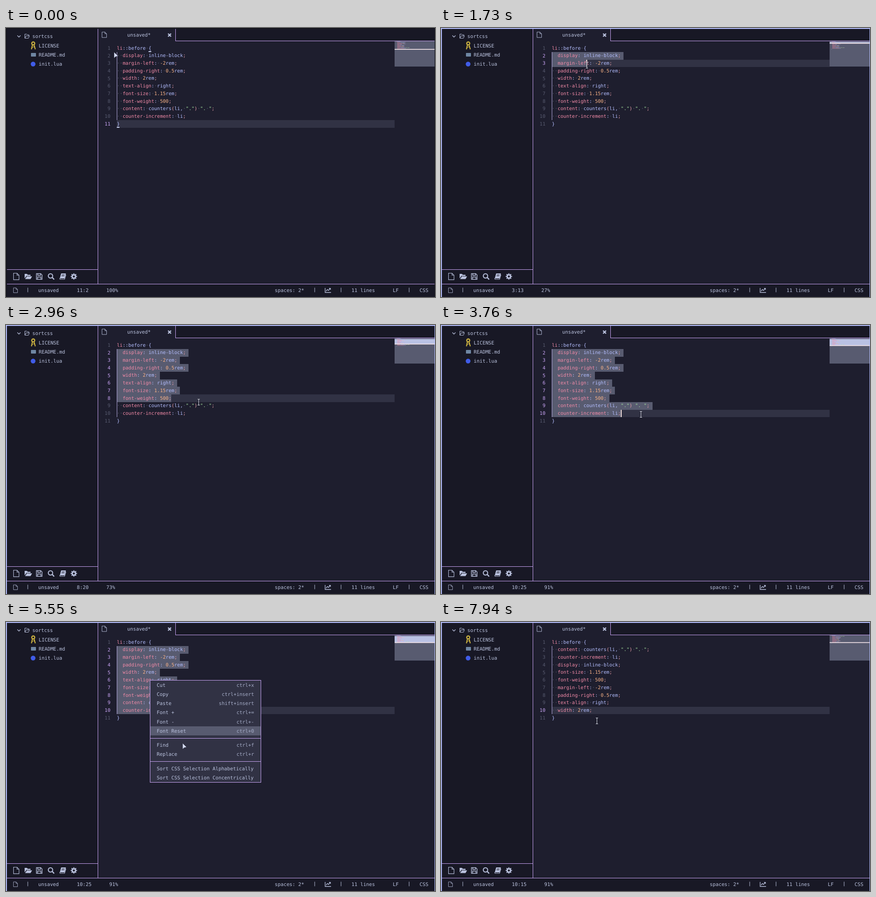
These frames come from a looping animation (945 by 593 pixels, 8 s). An HTML page:

```html
<!DOCTYPE html>
<html lang="en">
<head>
<meta charset="utf-8">
<title>Sorting CSS in an editor</title>
<style>
  html, body { margin: 0; width: 100%; height: 100%; overflow: hidden; background: #181825; }
  svg { display: block; width: 945px; height: 593px; }
  text { font-family: "DejaVu Sans Mono", "Noto Sans Mono", monospace; text-rendering: geometricPrecision; white-space: pre; }
  .ui text { font-size: 10.75px; fill: #bac2de; }
  .code text { font-size: 10.5px; }
  .end { text-anchor: end; }
  .crisp { shape-rendering: crispEdges; }
  .line { fill: none; stroke: #bac2de; }
  .fill { fill: #bac2de; }
  .edge { fill: none; stroke: #cba6f7; shape-rendering: crispEdges; }
  .prop { fill: #f38ba8; }
  .word { fill: #b4befe; }
  .num { fill: #fab387; }
  .str { fill: #a6e3a1; }
  .punct { fill: #eba0ac; }
  .dot { fill: #585b70; }
  #numbers text { fill: #585b70; }
  #numbers .on { fill: #cba6f7; }
  #menu .key { fill: #a6adc8; }
</style>
</head>
<body>
<svg viewBox="0 0 945 593">
  <defs>
    <path id="file" d="M.5.5h7l4 4v9H.5zM7.5.5v4h4"/>
  </defs>

  <rect width="945" height="593" fill="#181825"/>
  <path class="crisp" d="M203 0h170v29h572v535H203z" fill="#1e1e2e"/>

  <g class="crisp">
    <rect id="lineBg" x="244" width="612" height="17" fill="#313244"/>
    <path id="selection" fill="#585b70"/>
    <rect x="244" y="53" width="1" height="150" fill="#b4a8dc"/>
  </g>
  <g class="code">
    <g id="numbers"></g>
    <g id="before"></g>
    <g id="after"></g>
  </g>
  <path id="brackets" class="crisp" d="M314 51h6v1.5h-6zM244 218h6v1.5h-6z" fill="#cdd6f4"/>
  <rect id="caret" class="crisp" width="2" height="16" fill="#f5e0dc"/>

  <rect class="crisp" x="856" y="29" width="89" height="56" fill="#585b70"/>
  <rect id="mapSel" x="856" y="31" width="89" fill="#bac2e4"/>
  <g id="mapBefore" opacity=".62"></g>
  <g id="mapAfter" opacity=".62"></g>
  <rect id="mapCaret" x="856" width="89" height="1.7" fill="#f5e6ea"/>

  <path class="edge" d="M202.5 0V564M373.5 2V28.5H945M0 532.5H202M0 564.5H945"/>

  <g class="ui">
    <path class="line" d="M25 16.5l3.5 3.5 3.5-3.5" stroke-width="1.3"/>
    <path class="line" d="M41.5 22.5v-9h4l1.5 1.5h3.5v2.5M41.5 22.5l2.5-5h7.5l-2 5z"/>
    <text x="58" y="22">sortcss</text>
    <g fill="none" stroke="#c9b040">
      <circle cx="60" cy="34" r="3.3" stroke-width="2.4"/>
      <path d="M58.5 36l-2.5 11M61.5 36l3 11M57 42l2 1M62.5 41l-2 1" stroke-width="2.2"/>
    </g>
    <text x="72" y="42.5">LICENSE</text>
    <rect x="55" y="55" width="11" height="8" rx="1" fill="#6f87a3"/>
    <text x="72" y="62.5">README.md</text>
    <circle cx="59.7" cy="79.5" r="5.2" fill="#405ce8"/>
    <text x="72" y="82.5">init.lua</text>

    <use href="#file" class="line" transform="translate(211 8.5) scale(.92)"/>
    <text x="267" y="18.5">unsaved*</text>
    <path class="line" d="M357 12.3l6.6 6.6m0-6.6l-6.6 6.6" stroke-width="2.5"/>

    <use href="#file" class="line" transform="translate(16 540) scale(1.1)"/>
    <path class="fill" d="M41 552v-10h5l2 2h6v2.500h-9zM42 553.500l4-6h11.500l-3.500 6z"/>
    <path class="line" d="M67 541.500h9.500l3 3v9.500H67zM70 541.500v4h6v-4M69.500 554v-5h7.500v5" stroke-width="1.4"/>
    <path class="line" d="M102 550l4 4.500" stroke-width="2.6"/>
    <circle class="line" cx="98" cy="546.500" r="4.800" stroke-width="2.1"/>
    <path class="fill" d="M121.500 541h10.500l-3 11h-10.500z"/>
    <path class="line" d="M118.500 551.500q-.500 2.500 1.500 2.500h9l3-10" stroke-width="1.2"/>
    <path d="M123 544h6m-6.700 2.500h6" stroke="#181825"/>
    <circle class="line" cx="149.500" cy="547.700" r="3.700" stroke-width="3"/>
    <circle class="line" cx="149.500" cy="547.700" r="5.800" stroke-width="2.400" pathLength="16" stroke-dasharray="1" stroke-dashoffset=".5"/>

    <use href="#file" class="line" transform="translate(16 572.500) scale(.82)"/>
    <path class="line" d="M48 572.500v10M680 572.500v10M738 572.500v10M888 572.500v10"/>
    <text x="71" y="581.500">unsaved</text>
    <text id="position" x="156" y="581.500"></text>
    <text id="percent" y="581.500"></text>
    <text x="592" y="581.500">spaces: 2*</text>
    <path class="line" d="M703 573v10h13M705 580l3-3.500 2.500 2 4-4.500M711.500 574h3.200v3.200" stroke-width="1.300"/>
    <text x="761" y="581.500">11 lines</text>
    <text x="852" y="581.500">LF</text>
    <text x="911" y="581.500">CSS</text>

    <g id="menu">
      <rect class="crisp" x="317" y="128" width="244" height="226" fill="#313244"/>
      <rect id="hover" class="crisp" x="318" width="243" height="20" fill="#585b70"/>
      <path class="edge" d="M317.500 128.500h243.500v225H317.500zM317.500 256.500H561M317.500 307.500H561"/>
    </g>
  </g>

  <path id="frame" class="crisp" d="M0 0H945V593H944V1.500H2V593H0z"/>
  <path id="arrow" d="M0 0V13.500L3.300 10.300 9 9z" fill="#d5dcf5" stroke="#181825" stroke-width=".6"/>
  <g id="beam" fill="none">
    <path d="M-2.500-6.500h5M0-6.500v13M-2.500 6.500h5" stroke="#11111b" stroke-width="2.4" opacity=".6"/>
    <path d="M-2.500-6.500h5M0-6.500v13M-2.500 6.500h5" stroke="#e6e9f7"/>
  </g>
</svg>

<script>
const LOOP = 8000;
const CHAR = 6.3215, LEFT = 244.3, TOP = 36.2, ROW = 16.7, MAP_ROW = 1.67;
const FOCUS = 840, DRAG_END = 3600, MENU_OPEN = 4680, SORTED = 7310, DESELECT = 7710;

const $ = id => document.getElementById(id);
const show = (id, on) => $(id).setAttribute('display', on ? 'inline' : 'none');
const set = (id, attrs) => Object.entries(attrs).forEach(([k, v]) => $(id).setAttribute(k, v));
const place = (id, x, y) => set(id, { transform: `translate(${x} ${y})` });
const rowTop = line => Math.round(TOP + ROW * (line - 1));
const mapTop = line => 29.5 + MAP_ROW * (line - 1);

const rules = [
  'display: inline-block;', 'margin-left: -2rem;', 'padding-right: 0.5rem;',
  'width: 2rem;', 'text-align: right;', 'font-size: 1.15rem;', 'font-weight: 500;',
  'content: counters(li, ".") ". ";', 'counter-increment: li;'
];
const wrap = list => ['li::before {', ...list.map(r => '  ' + r), '}'];
const unsorted = wrap(rules), sorted = wrap([...rules].sort());

const kinds = [
  ['str', /^"/], ['num', /^-?\d/], ['dot', /^ /], ['punct', /^[();]/], ['word', /./]
];

function tokens(line) {
  const pattern = /"[^"]*"|-?\d[\d.]*|[a-z-]+(?=:)|[a-z-]+| +|./g;
  return [...line.matchAll(pattern)].map(m => {
    const isProp = /^[a-z]/.test(m[0]) && line[m.index + m[0].length] === ':' && m.index < 3;
    return { text: m[0], at: m.index, kind: isProp ? 'prop' : kinds.find(k => k[1].test(m[0]))[0] };
  });
}

function codeLine(line, i) {
  const spans = tokens(line).map(({ text, kind }) => {
    const body = text.replace(/ /g, kind === 'dot' ? '·' : '<tspan class="dot">·</tspan>');
    return `<tspan class="${kind}">${body}</tspan>`;
  });
  return `<text x="${LEFT}" y="${TOP + ROW * i + 11.4}">${spans.join('')}</text>`;
}

const mapLine = (line, i) => tokens(line).filter(k => k.kind !== 'dot').map(k =>
  `<rect class="${k.kind}" x="${860 + k.at * .85}" y="${mapTop(i + 1)}" width="${k.text.length * .85}" height=".9"/>`).join('');

$('before').innerHTML = unsorted.map(codeLine).join('');
$('after').innerHTML = sorted.map(codeLine).join('');
$('mapBefore').innerHTML = unsorted.map(mapLine).join('');
$('mapAfter').innerHTML = sorted.map(mapLine).join('');
$('numbers').innerHTML = unsorted.map((_, i) =>
  `<text class="end" x="230" y="${TOP + ROW * i + 11.6}">${i + 1}</text>`).join('');
const numbers = [...$('numbers').children];

const ITEM = 20.2;
const items = [
  [129, 'Cut', 'ctrl+x'], [149.2, 'Copy', 'ctrl+insert'], [169.4, 'Paste', 'shift+insert'],
  [189.6, 'Font +', 'ctrl+='], [209.8, 'Font -', 'ctrl+-'], [230, 'Font Reset', 'ctrl+0'],
  [261, 'Find', 'ctrl+f'], [281.2, 'Replace', 'ctrl+r'],
  [312.8, 'Sort CSS Selection Alphabetically', ''], [333, 'Sort CSS Selection Concentrically', '']
];
$('menu').insertAdjacentHTML('beforeend', items.map(([y, label, key]) =>
  `<text x="332" y="${y + 13.8}">${label}</text><text class="key end" x="546.5" y="${y + 13.8}">${key}</text>`).join(''));

// Pointer path: time, x, y
const path = [
  [0, 238, 53], [20, 238, 53], [110, 227, 55], [230, 248, 61], [380, 248, 61], [500, 248, 53],
  [610, 247, 61], [1040, 247, 61], [1730, 321, 82], [2390, 398, 139], [2570, 412, 152],
  [2670, 414, 154], [3420, 440, 195], [3520, 440, 197], [3760, 440, 197], [4560, 317, 129],
  [4680, 317, 129], [5450, 380, 243], [5549, 380, 243], [5550, 389, 267], [6340, 402, 326],
  [6440, 402, 326], [6500, 405, 336], [6580, 406, 327], [6970, 406, 327], [6990, 406, 324],
  [7690, 406, 324], [7940, 343, 218], [LOOP, 343, 218]
];

function pointer(t) {
  const i = Math.max(1, path.findIndex(p => p[0] > t));
  const [a, b] = [path[i - 1], path[i]];
  const k = (t - a[0]) / (b[0] - a[0]);
  return { x: a[1] + (b[1] - a[1]) * k, y: a[2] + (b[2] - a[2]) * k };
}

function cursor(t) {
  if (t < FOCUS) return { line: 11, col: 2 };
  if (t >= SORTED) return { line: 10, col: 15 };
  const p = pointer(Math.min(t, DRAG_END));
  const line = Math.min(10, Math.max(2, Math.floor((p.y - 3 - TOP) / ROW) + 1));
  const col = Math.round((p.x - LEFT) / CHAR);
  return { line, col: Math.min(unsorted[line - 1].length, Math.max(0, col)) + 1 };
}

function selectionPath(lines, { line, col }) {
  let d = '';
  for (let i = 2; i <= line; i++) {
    const chars = i < line ? lines[i - 1].length + 1 : col - 1;
    d += `M244 ${rowTop(i)}H${LEFT + chars * CHAR}V${rowTop(i + 1)}H244z`;
  }
  return d;
}

function render(t) {
  const isSorted = t >= SORTED, focused = t >= FOCUS;
  const menu = t >= MENU_OPEN && !isSorted;
  const selecting = focused && t < DESELECT;
  const at = cursor(t), p = pointer(t);

  ['before', 'mapBefore'].forEach(id => show(id, !isSorted));
  ['after', 'mapAfter'].forEach(id => show(id, isSorted));
  show('brackets', !focused);
  set('frame', { fill: focused ? '#b4befe' : '#11111b' });

  set('lineBg', { y: rowTop(at.line), height: rowTop(at.line + 1) - rowTop(at.line) });
  set('selection', { d: selecting ? selectionPath(isSorted ? sorted : unsorted, at) : '' });
  numbers.forEach((n, i) => n.classList.toggle('on',
    i + 1 === at.line || (selecting && i > 0 && i < at.line)));

  set('caret', { x: Math.round(LEFT + (at.col - 1) * CHAR - .4), y: rowTop(at.line) });
  show('caret', (t >= 1640 && t < 1840) || (t >= 3760 && t < 4160) || (t >= 4560 && t < 4960));

  set('mapCaret', { y: mapTop(at.line) });
  set('mapSel', { height: selecting ? mapTop(at.line) - 31 + .5 : 0 });

  const pos = `${at.line}:${at.col}`;
  $('position').textContent = pos;
  $('percent').textContent = Math.round(at.line / 11 * 100) + '%';
  set('percent', { x: 195.2 + pos.length * 6.47 });

  show('menu', menu);
  if (menu) {
    const y = pointer(t - 60).y;
    const item = items.find(([top]) => y >= top && y < top + ITEM);
    show('hover', !!item);
    if (item) set('hover', { y: Math.round(item[0]) });
  }

  const arrow = menu || p.x < 244;
  show('arrow', arrow);
  show('beam', !arrow);
  place('arrow', Math.round(p.x), Math.round(p.y));
  place('beam', Math.round(p.x) + .5, Math.round(p.y));
}

function tick() {
  render(performance.now() % LOOP);
  requestAnimationFrame(tick);
}
tick();
</script>
</body>
</html>
```
